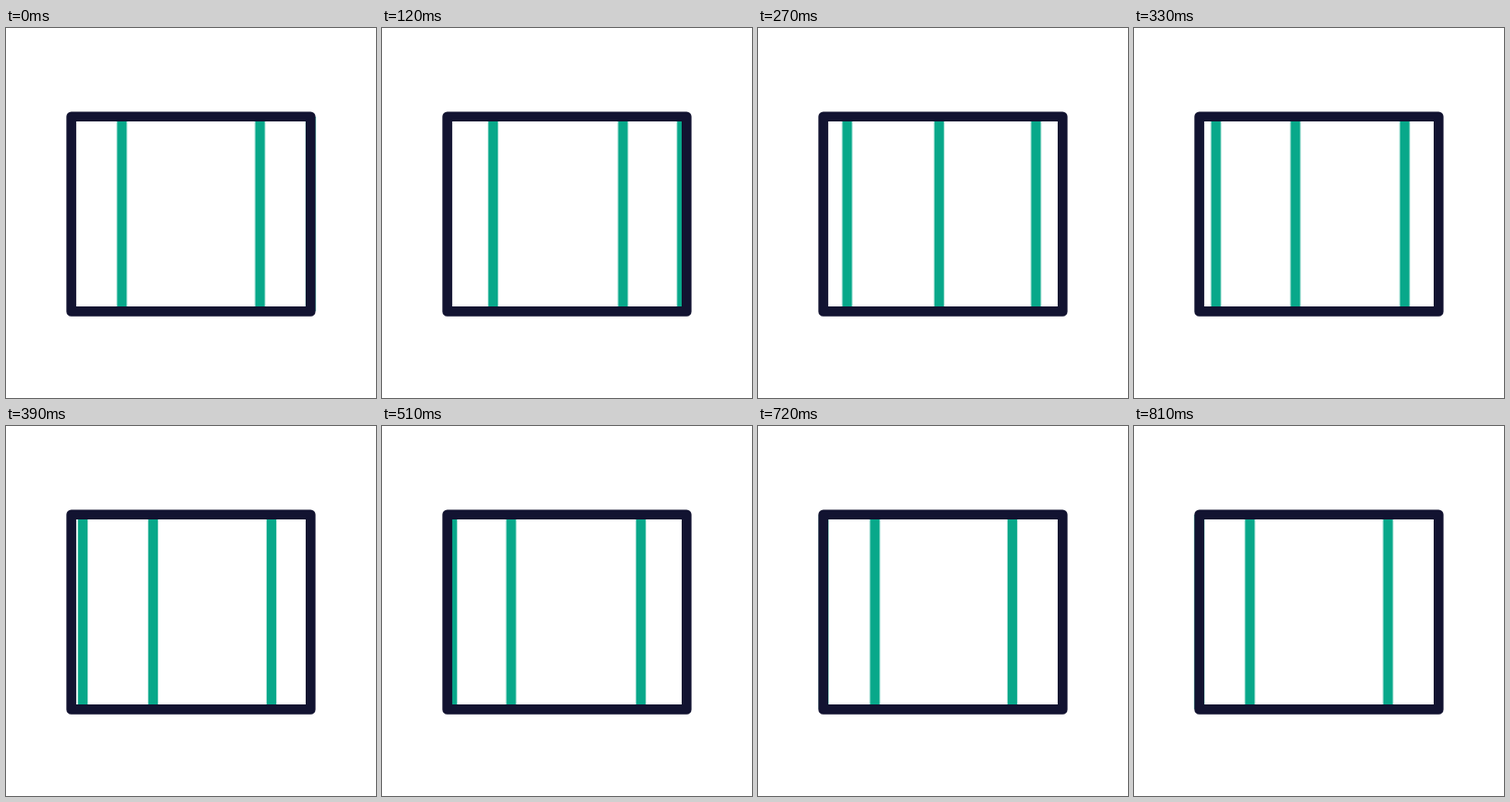
Animation of 400x400 px, one loop 2.84 s. Source, as an HTML page:

```html
<!DOCTYPE html>
<html lang="en">
<head>
<meta charset="utf-8">
<title>Sliding columns</title>
<style>
  html, body { margin: 0; width: 100%; height: 100%; overflow: hidden; background: #fff; }
  svg { display: block; width: 100vw; height: 100vh; }
  .bar { stroke: #08a88a; stroke-width: 10.6; }
  .frame { fill: none; stroke: #121331; stroke-width: 10.6; stroke-linejoin: round; }
</style>
</head>
<body>
<svg viewBox="0 0 400 400">
  <g id="bars"></g>
  <rect class="frame" x="70.6" y="95.7" width="258.7" height="210.7"/>
</svg>
<script>
  const LOOP = 2840, SLIDE = 810, STEP = 30;
  // Each bar slides into the place of its left neighbour.
  const stops = [70.6, 125.3, 274.6, 329.4];
  const bars = document.getElementById('bars');

  const slides = stops.slice(1).map((from, i) => {
    const bar = document.createElementNS('http://www.w3.org/2000/svg', 'path');
    bar.setAttribute('class', 'bar');
    bar.setAttribute('d', 'M0 96V306');
    bars.append(bar);
    const slide = bar.animate(
      [{ transform: `translateX(${from}px)` }, { transform: `translateX(${stops[i]}px)` }],
      { duration: SLIDE, easing: 'cubic-bezier(.333, 0, .19, 1)', fill: 'both' });
    slide.pause();
    return slide;
  });

  const start = performance.now();
  function draw() {
    const t = (performance.now() - start) % LOOP;
    const held = Math.min(SLIDE, Math.floor(t / STEP) * STEP);
    for (const slide of slides) slide.currentTime = held;
    requestAnimationFrame(draw);
  }
  draw();
</script>
</body>
</html>
```
